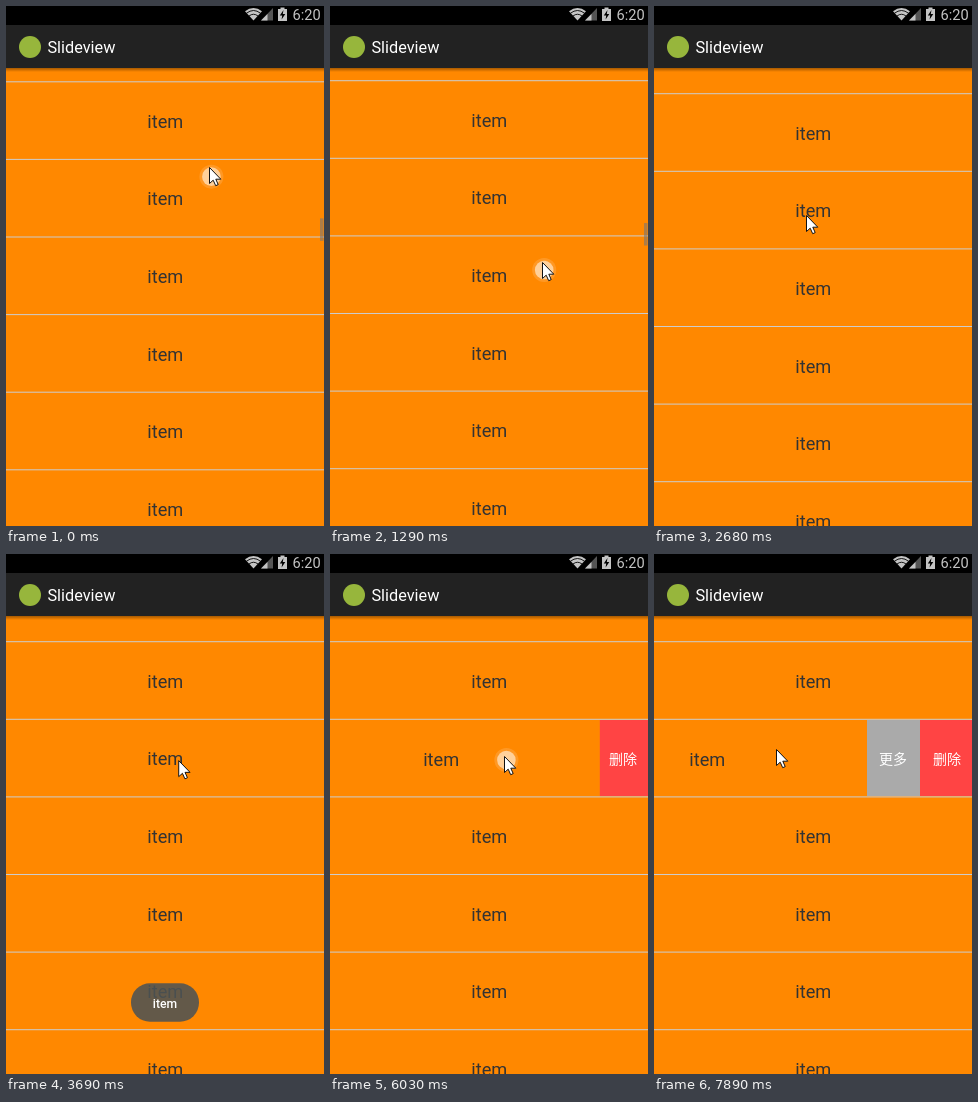
An HTML page that plays this animation: 318x520 px, repeating every 8000 ms.

```html
<!DOCTYPE html>
<html lang="en">
<head>
<meta charset="utf-8">
<title>Slideview</title>
<style>
html, body { margin: 0; width: 100%; height: 100%; overflow: hidden; background: #000; }
svg { display: block; width: 318px; height: 520px; }
text { font-family: Roboto, sans-serif; }
.item { font-size: 18.2px; fill: #333; text-anchor: middle; }
.menu { font: 500 14px "Noto Sans CJK SC", "Noto Sans CJK", sans-serif; fill: #fff; text-anchor: middle; }
</style>
</head>
<body>
<svg viewBox="0 0 318 520">
  <defs>
    <linearGradient id="shade" x2="0" y2="1">
      <stop offset="0" stop-color="#000" stop-opacity=".35"/>
      <stop offset="1" stop-color="#000" stop-opacity="0"/>
    </linearGradient>
  </defs>
  <rect y="62" width="318" height="458" fill="#f80"/>
  <g id="list"></g>
  <g id="slide">
    <rect x="213" y="166" width="53" height="76" fill="#aaa"/>
    <rect x="266" y="166" width="52" height="76" fill="#f44"/>
    <text class="menu" x="239" y="209.5">更多</text>
    <text class="menu" x="293" y="209.5">删除</text>
    <rect id="cover" y="166" width="318" height="76" fill="#f80"/>
    <text id="label" class="item" x="159.3" y="211.5">item</text>
  </g>
  <rect id="thumb" x="314" width="3.5" height="22.5" fill="#777" fill-opacity=".6"/>
  <g id="toast">
    <rect x="125" y="429.3" width="68" height="38.4" rx="19" fill="#4e5454" fill-opacity=".88"/>
    <text x="159" y="453.7" font-size="12.2" font-weight="500" fill="#fff" text-anchor="middle">item</text>
  </g>
  <rect y="62" width="318" height="4" fill="url(#shade)"/>
  <rect width="318" height="19" fill="#000"/>
  <rect y="19" width="318" height="43" fill="#222"/>
  <circle cx="24" cy="41" r="11" fill="#97b63c"/>
  <text x="41.4" y="47" font-size="16.3" fill="#fff">Slideview</text>
  <g fill="#c4c4c4">
    <path d="M239 5.3Q247.5 -1.5 256 5.3L247.5 14.5Z"/>
    <path d="M240.5 7.2Q247.5 1.8 254.5 7.2M243 10Q247.5 6.5 252 10" fill="none" stroke="#000" stroke-width=".9"/>
    <path d="M267 2V14.5H255Z" fill="#555"/>
    <path d="M261.5 8V14.5H255Z"/>
    <path d="M274.5 1.5H278.5V3H281V15H272V3H274.5Z"/>
    <path d="M277.5 4L273.8 9.5H276.2L275.6 13.5L279.3 8H276.8Z" fill="#000"/>
    <text x="286.5" y="14" font-size="14.6">6:20</text>
  </g>
  <g id="touch" fill="#fff">
    <circle r="12" fill-opacity=".14"/>
    <circle r="9.3" fill-opacity=".54"/>
  </g>
  <path id="cursor" d="M.5 .5V16.5L4.2 13.2L6.7 18.7L9.2 17.6L6.8 12.2H11.8Z" fill="#fff" stroke="#111"/>
</svg>
<script>
const LOOP = 8000, STEP = 139.3, LEAD = 106;  // ms
const PITCH = 77.6, MENU = 106;
const $ = id => document.getElementById(id);

const clamp = (v, lo, hi) => Math.min(hi, Math.max(lo, v));
const lin = (n, a, b) => clamp((n - a) / (b - a), 0, 1);
const out = (n, a, b) => 1 - (1 - lin(n, a, b)) ** 2;
const smooth = (n, a, b) => { const u = lin(n, a, b); return u * u * (3 - 2 * u); };

// Pointer moves: first step, last step, end x, end y, easing
const moves = [
  [-2, 0, 203, 161, smooth],
  [1, 4, 208, 338, smooth],
  [4, 10, 212, 256, smooth],
  [11, 20, 152, 209, smooth],
  [25, 31, 230, 198, smooth],
  [31, 42, 174, 202, out],
  [44, 53, 153, 201, lin],
  [54, 57, 122, 195, lin],
];

function pointer(n) {
  let x = 203, y = 177;
  for (const [a, b, toX, toY, ease] of moves) {
    const u = ease(n, a, b);
    x += (toX - x) * u;
    y += (toY - y) * u;
  }
  return [x, y];
}

const pressed = n => n < 2 || (n > 3 && n < 12) || n === 22 || (n > 31 && n < 57);

const scroll = n =>
  75.3 - 12.1 * out(n, 1, 5) - 66.6 * lin(n, 5, 10) - 64.6 * out(n, 10, 16);

let rows = "";
for (let i = 0; i < 8; i++) {
  const y = i * PITCH;
  rows += `<rect y="${y}" width="318" height="1" fill="#ccc"/>` +
    `<text class="item" x="159.3" y="${y + 46.6}">item</text>`;
}
$("list").innerHTML = rows;

const move = (id, x, y) => $(id).setAttribute("transform", `translate(${x} ${y})`);
const fade = (id, v) => $(id).setAttribute("opacity", v);

function draw(ms) {
  const n = Math.floor((ms + LEAD) / STEP);  // the picture changes in steps
  const top = scroll(n);
  const [x, y] = pointer(n);
  const [dotX, dotY] = pointer(n - .8);  // the touch dot lags behind

  move("list", 0, (top + PITCH) % PITCH);
  move("thumb", 0, 216.8 - top / 17);
  fade("thumb", 1 - lin(n, 16, 19));

  // The row runs ahead of the finger until the menu is fully open.
  const open = n > 31 ? clamp(1.32 * (210.5 - x), 0, MENU) : 0;
  move("cover", -open, 0);
  move("label", -open, 0);
  $("slide").style.display = open ? "" : "none";

  fade("toast", lin(n, 22, 24) - lin(n, 37, 40));
  move("cursor", x, y);
  move("touch", dotX + 2.4, dotY + 4);
  fade("touch", pressed(n) ? 1 : 0);
}

const origin = performance.now();
function tick() {
  draw((performance.now() - origin) % LOOP);
  requestAnimationFrame(tick);
}
tick();
</script>
</body>
</html>
```
